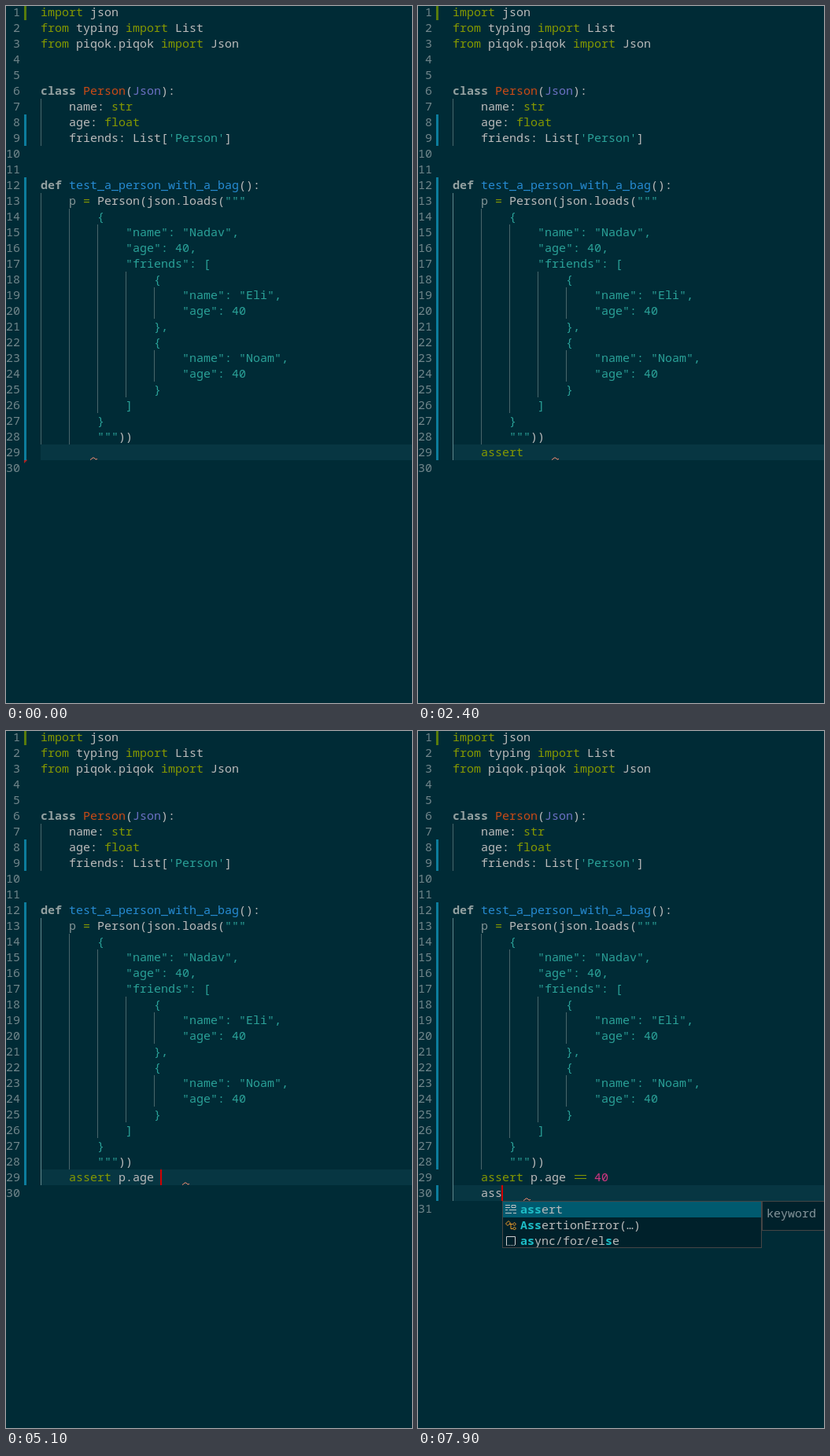
Recreate the animation shown at these times as an HTML page. Size 516 px wide and 887 px high, loop 8000 ms.

```html
<!DOCTYPE html>
<html lang="en">
<head>
<meta charset="utf-8">
<title>Editor typing loop</title>
<style>
html, body { margin: 0; width: 100%; height: 100%; overflow: hidden; background: #002b36; }
#stage { position: absolute; left: 0; top: 0; width: 516px; height: 887px; overflow: hidden; color: #bbb;
  font: 15px/20px "Noto Sans Mono", "DejaVu Sans Mono", monospace; font-variant-ligatures: none; }
#stage div, #stage pre, #stage svg { position: absolute; }
pre { margin: 0; font: inherit; white-space: pre; }
i { font-style: normal; }
#code { left: 44px; top: -3px; }
#nums { left: 0; top: -3px; width: 18px; text-align: right; color: #71868b; }
.k { color: #859900; }
.h { color: #93a1a1; font-weight: 700; }
.c { color: #cb4b16; }
.t { color: #6c71c4; }
.f { color: #268bd2; }
.s { color: #2aa198; }
.n { color: #d33682; }
.v { color: #839496; }
.eq { color: transparent; background:
  linear-gradient(#859900, #859900) 2px 8px / 15px 1px no-repeat,
  linear-gradient(#859900, #859900) 2px 12px / 15px 1px no-repeat; }
#line { left: 44px; right: 0; height: 20px; background: #073642; }
.guide { width: 1px; background: #49666b; }
.guide.on { background: #61868b; }
.bar { left: 23px; width: 3px; background: #0c7d9d; }
#tri { left: 23px; border: solid transparent; border-width: 4px 0 4px 4px; border-left-color: #b3201f; }
#caret { width: 2px; height: 20px; background: #d30102; }
#wave { width: 9px; height: 4px; fill: none; stroke: #ee8a70; }
.box { box-sizing: border-box; overflow: hidden; background: #00212b; border: 1px solid #454545; }
#list { width: 330px; }
.item { left: 0; right: 0; height: 20px; white-space: pre; }
.item:first-child { background: #005a6f; }
.item span { position: absolute; left: 22px; top: -1px; }
.item b { color: #1ebcc5; }
.item svg { left: 2px; top: 2px; width: 16px; height: 16px; fill: none; }
#thumb { right: 0; top: 0; width: 10px; background: rgba(121, 121, 121, .4); }
#info { width: 330px; white-space: pre; }
#info div { left: 5px; }
.head { top: 4px; color: #84949a; }
.doc { font: 14.3px/20px "Open Sans", "Noto Sans", "DejaVu Sans", sans-serif; }
</style>
</head>
<body>
<div id="stage">
<div id="line"></div>
<div id="guides"></div>
<pre id="nums"></pre>
<pre id="code"><i class="k">import</i> json
<i class="k">from</i> typing <i class="k">import</i> List
<i class="k">from</i> piqok.piqok <i class="k">import</i> Json


<i class="h">class</i> <i class="c">Person</i>(<i class="t">Json</i>):
    name: <i class="k">str</i>
    age: <i class="k">float</i>
    friends: List[<i class="s">'Person'</i>]


<i class="h">def</i> <i class="f">test_a_person_with_a_bag</i>():
    <i class="v">p</i> <i class="k">=</i> Person(json.loads(<i class="s">"""
        {
            "name": "Nadav",
            "age": 40,
            "friends": [
                {
                    "name": "Eli",
                    "age": 40
                },
                {
                    "name": "Noam",
                    "age": 40
                }
            ]
        }
        """</i>))
<span id="typed"></span></pre>
<div id="tri"></div>
<div id="bars"></div>
<svg id="wave" viewBox="0 0 9 4"><path d="M0 3.2H1L3 1H5L7 3H8L9 2"/></svg>
<div id="caret"></div>
<div id="list" class="box"></div>
<div id="info" class="box"></div>
</div>
<script>
const $ = id => document.getElementById(id);
const LOOP = 8000;
const rowTop = row => row * 20 - 22;
const colX = col => 44 + col * 9;

// icon letter: [colour, path]
const ICONS = {
  f: ['#b180d7', 'M8 1.5 13.5 4.5V11L8 14.5 2.5 11V4.5ZM2.5 4.5 8 7.7 13.5 4.5M8 7.7V14.5'],
  k: ['#c5c5c5', 'M1 2.5H7M1 5.5H7M9 2.5H14V5.5H9ZM1 8.5H4M6 8.5H15M1 12.5H9M11 12.5H15'],
  c: ['#ee9d28', 'M1.5 6 5 2.5 7.5 5 4 8.5ZM6 6.5H10.5M8 6.5V12.5H10.5M10.5 6.5 12.5 4.5 14.5 6.5 12.5 8.5ZM10.5 12 12.5 10 14.5 12 12.5 14Z'],
  s: ['#d0d0d0', 'M2.5 13V2.5H13.5V13M2 13.5H3M4 13.5H5M6 13.5H7M8 13.5H9M10 13.5H11M12 13.5H13'],
  v: ['#ee9d28', 'M1.5 7.5H8.5V13.5H1.5ZM3 9.5H7M3 11.5H7M7.5 5.5V2.5H14.5V8.5H10.5M9 4.5H13M10.5 6.5H13'],
  p: ['#75beff', 'M4 3.5H1.5V12.5H4M12 3.5H14.5V12.5H12M4.5 8 8.5 5.5 11.5 7V9L7.5 11 4.5 9.8ZM4.5 8 7.5 9 11.5 7M7.5 9V11']
};

// each entry: icon letter, colon, label
const LISTS = {
  a: ['a', 'f:abs f:all f:any f:apply f:ascii k:assert c:ArithmeticError c:AssertionError c:AttributeError s:add/new/cell s:async/def s:async/for'],
  as: ['as', 'f:ascii k:assert c:AssertionError s:async/def s:async/for'],
  ass: ['ass', 'k:assert c:AssertionError(…) s:async/for/else'],
  p: ['p', 'v:p f:pow f:print v:property c:Person(…) c:PendingDeprecationWarning c:PermissionError c:ProcessLookupError s:pdb s:pudb'],
  dot: ['', 'v:age p:obj p:name p:age p:friends v:friends p:__annotations__ f:__class__ f:__delattr__ p:__dict__ f:__dir__ p:__doc__']
};

const BUILTIN = '[𝕥𝕒𝕣𝕟] <b>__builtins__.';
const INFO = {
  abs: [161, 'function 𝕥𝕒𝕣𝕟', BUILTIN + 'abs</b>', 'Return the absolute value\nargument may be an integer\nfloating point number or\ncomplex number'],
  ascii: [106, 'function 𝕥𝕒𝕣𝕟', BUILTIN + 'ascii</b>', 'Return a string with'],
  keyword: [38, 'keyword'],
  person: [38, 'Person'],
  float: [38, 'float']
};

const kw = '<i class="k">assert</i> ';
const eq = '<i class="eq">==</i>';
const done = kw + `p.age ${eq} <i class="n">40</i>`;
const hide = { list: '', info: '' };

// time and what changes then; col is the caret column
const STEPS = [
  [0, { row: 29, prev: '', text: '', col: 4, caret: 0, tri: 578, bars: [[218, 360]], thumb: 0, ...hide }],
  [100, { caret: 1 }],
  [600, { text: 'a', col: 5 }],
  [700, { list: 'a', thumb: 205 }],
  [800, { text: '<i class="k">as</i>', col: 6, list: 'as', info: 'ascii', thumb: 0 }],
  [1000, { text: 'ass', col: 7, list: 'ass', info: 'keyword' }],
  [1200, { tri: 0 }],
  [1400, { caret: 0 }],
  [1900, { text: kw, col: 11, caret: 1, ...hide }],
  [2400, { caret: 0 }],
  [3000, { text: kw + 'p', col: 12, caret: 1, list: 'p', info: 'person' }],
  [3300, { text: kw + 'p.', col: 13 }],
  [3400, { list: 'dot', info: 'float' }],
  [3500, { thumb: 47 }],
  [4400, { text: kw + 'p.age', col: 16, thumb: 0, ...hide }],
  [4900, { caret: 0 }],
  [5100, { col: 17, caret: 1 }],
  [5300, { text: kw + 'p.age <i class="k">=</i>', col: 18 }],
  [5500, { text: kw + 'p.age ' + eq, col: 19 }],
  [5600, { col: 20 }],
  [5900, { text: kw + `p.age ${eq} <i class="n">4</i>`, col: 21 }],
  [6200, { text: done, col: 22 }],
  [6400, { tri: 598 }],
  [6600, { caret: 0 }],
  [6900, { row: 30, prev: done, text: '', col: 4, caret: 1, tri: 618 }],
  [7100, { bars: [[218, 340], [578, 20]] }],
  [7400, { text: 'a', col: 5 }],
  [7500, { list: 'a', thumb: 205 }],
  [7600, { info: 'abs' }],
  [7700, { text: '<i class="k">as</i>', col: 6, thumb: 0, tri: 0, list: 'as', info: '' }],
  [7800, { info: 'ascii' }],
  [7900, { text: 'ass', col: 7, list: 'ass', info: 'keyword' }]
];
let last = {};
const STATES = STEPS.map(([at, change]) => (last = { ...last, ...change, at }));

// x, first row, last row
const GUIDES = [[44, 7, 9], [80, 14, 28], [116, 15, 26], [152, 18, 25], [188, 19, 20], [188, 23, 24]];

const block = (cls, x, y, h) =>
  `<div class="${cls}" style="${x === null ? '' : `left:${x}px;`}top:${y}px;height:${h}px"></div>`;

function place(el, x, y, h) {
  el.style.left = x + 'px';
  el.style.top = y + 'px';
  if (h) el.style.height = h + 'px';
}

// bold the typed letters where they occur in order
function mark(label, typed) {
  let n = 0;
  return [...label].map(ch =>
    n < typed.length && ch.toLowerCase() === typed[n] ? (n++, `<b>${ch}</b>`) : ch).join('');
}

function item(entry, i, typed) {
  const [color, path] = ICONS[entry[0]];
  return `<div class="item" style="top:${i * 20}px">` +
    `<svg viewBox="0 0 16 16" stroke="${color}"><path d="${path}"/></svg>` +
    `<span>${mark(entry.slice(2), typed)}</span></div>`;
}

function drawList(s, x, y) {
  const el = $('list');
  el.hidden = !s.list;
  el.style.display = s.list ? '' : 'none';
  if (!s.list) return;
  const [typed, words] = LISTS[s.list];
  const items = words.split(' ');
  place(el, x, y, items.length * 20);
  el.innerHTML = items.map((entry, i) => item(entry, i, typed)).join('') +
    `<div id="thumb" style="height:${s.thumb}px"></div>`;
}

function drawInfo(s, x, y) {
  const el = $('info');
  el.style.display = s.info ? '' : 'none';
  if (!s.info) return;
  const [height, head, name, text] = INFO[s.info];
  place(el, x + 330, y, height);
  el.innerHTML = `<div class="head">${head}</div>` +
    (name ? `<div class="doc" style="top:40px">${name}</div><div class="doc" style="top:75px">${text}</div>` : '');
}

function draw(s) {
  const top = rowTop(s.row), x = colX(s.col);
  place($('line'), 44, top);
  place($('caret'), x - 1, top);
  $('caret').style.display = s.caret ? '' : 'none';
  place($('wave'), x + 27, top + 16);
  $('tri').style.display = s.tri ? '' : 'none';
  $('tri').style.top = s.tri - 4 + 'px';
  $('nums').textContent = Array.from({ length: s.row + 1 }, (_, i) => i + 1).join('\n');
  $('typed').innerHTML = (s.prev ? '    ' + s.prev + '\n' : '') + '    ' + s.text;

  const end = s.text ? top + 20 : top;
  $('guides').innerHTML = block(s.text ? 'guide on' : 'guide', 44, 238, end - 238) +
    GUIDES.map(([gx, a, b]) => block('guide', gx, rowTop(a), (b - a + 1) * 20)).join('');
  $('bars').innerHTML = '<div class="bar" style="top:0;height:18px;background:#587c0c"></div>' +
    [[138, 40], ...s.bars].map(([y, h]) => block('bar', null, y, h)).join('');
  drawList(s, x, top + 20);
  drawInfo(s, x, top + 20);
}

const start = performance.now();
let shown = null;
function tick() {
  const t = (performance.now() - start) % LOOP;
  const s = STATES.filter(state => state.at <= t).pop();
  if (s !== shown) draw(shown = s);
  // the scroll thumb of the member list fades in 100 ms steps
  if (s.at === 3500) $('thumb').style.opacity = Math.min(1, 1 - (Math.floor(t / 100) * 100 - 3700) / 850);
  requestAnimationFrame(tick);
}
tick();
</script>
</body>
</html>
```
